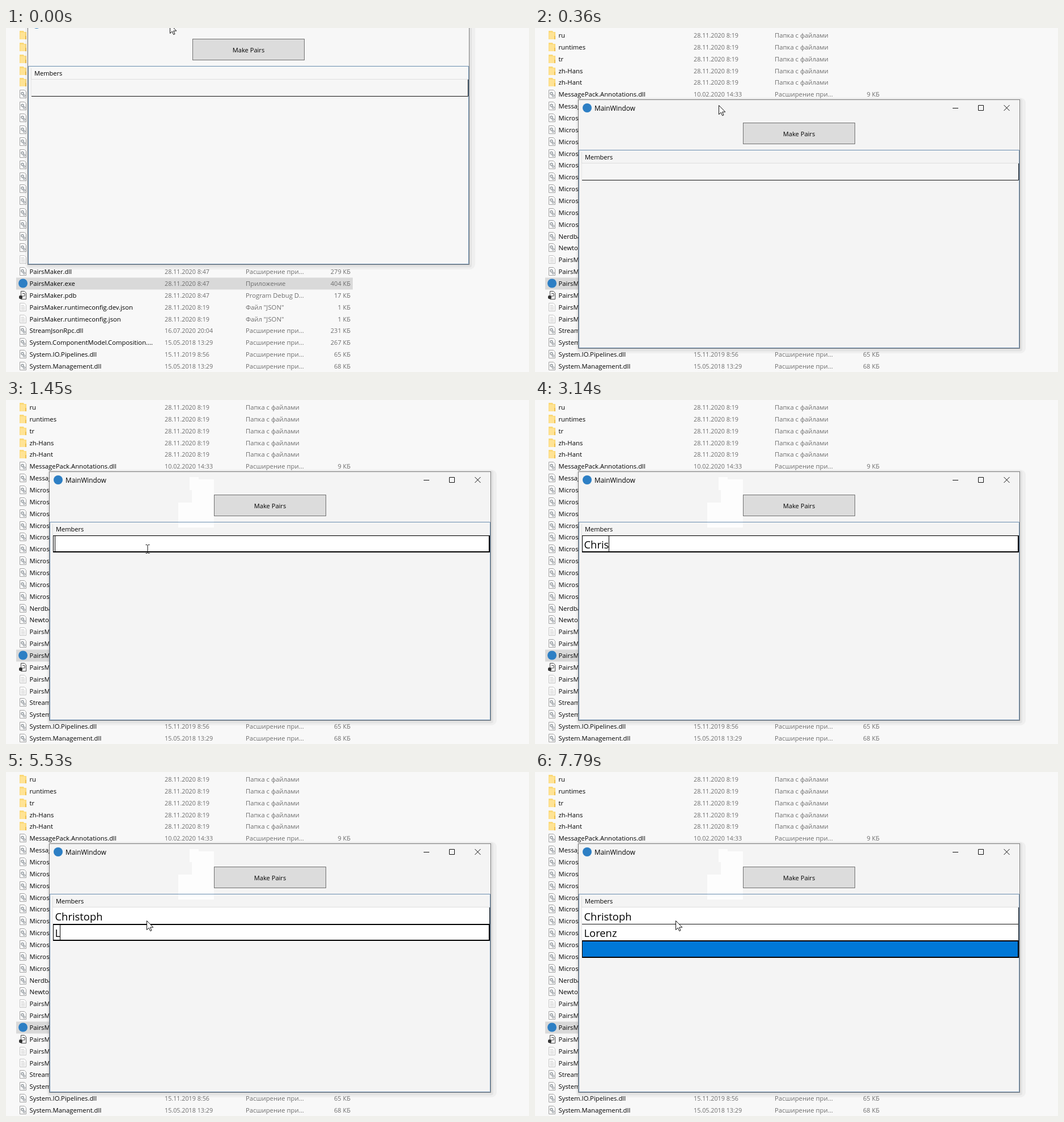
Animation, 923 px wide and 607 px high, one loop 8 s. Source, as an HTML page:

```html
<!DOCTYPE html>
<html lang="ru">
<head>
<meta charset="utf-8">
<title>Pairs</title>
<style>
html, body { margin: 0; width: 100%; height: 100%; overflow: hidden; background: #f8f8f8; }
svg { display: block; width: 100%; height: 100%; }
text { font: 11.3px "Open Sans", "Noto Sans", sans-serif; fill: #000; white-space: pre; }
.info { fill: #6d6d6d; }
.date { font-size: 10.75px; }
.size { font-size: 11px; text-anchor: end; }
.ui { font-size: 11.1px; }
.title { font-size: 11.8px; }
.cell { font-size: 18.4px; }
</style>
</head>
<body>
<svg id="stage" viewBox="0 0 923 607"></svg>
<script>
const NS = 'http://www.w3.org/2000/svg';
const LOOP = 8000;
const stage = document.getElementById('stage');

function add(parent, tag, attrs = {}, text) {
  const el = document.createElementNS(NS, tag);
  for (const k in attrs) el.setAttribute(k, attrs[k]);
  if (text !== undefined) el.textContent = text;
  parent.appendChild(el);
  return el;
}
const rect = (p, x, y, width, height, fill, more) => add(p, 'rect', { x, y, width, height, fill, ...more });
const path = (p, d, stroke, fill = 'none', more) => add(p, 'path', { d, stroke, fill, ...more });
const label = (p, x, y, cls, text) => add(p, 'text', { x, y, class: cls }, text);
const show = (el, on) => el.setAttribute('visibility', on ? 'inherit' : 'hidden');
const place = (el, x, y) => el.setAttribute('transform', `translate(${x} ${y})`);

// Latest entry of [time, ...values] that has started
const at = (steps, t) => steps.reduce((cur, s) => (s[0] <= t ? s : cur), steps[0]);

// ---- File list ----
const DLL = 'Расширение при...';
const DIR = ['dir', '28.11.2020 8:19', 'Папка с файлами', ''];
const JSON_TYPE = 'Файл "JSON"';
const hidden = name => [name, 'dll', '', '', ''];
const files = [
  ...['ru', 'runtimes', 'tr', 'zh-Hans', 'zh-Hant'].map(n => [n, ...DIR]),
  ['MessagePack.Annotations.dll', 'dll', '10.02.2020 14:33', DLL, '9 КБ'],
  hidden('MessagePack.dll'),
  ...Array.from({ length: 10 }, () => hidden('Microsoft.dll')),
  hidden('Nerdbank.Streams.dll'),
  hidden('Newtonsoft.Json.dll'),
  ['PairsMaker.deps.json', 'doc', '', '', ''],
  ['PairsMaker.dll', 'dll', '28.11.2020 8:47', DLL, '279 КБ'],
  ['PairsMaker.exe', 'app', '28.11.2020 8:47', 'Приложение', '404 КБ'],
  ['PairsMaker.pdb', 'pdb', '28.11.2020 8:47', 'Program Debug D...', '17 КБ'],
  ['PairsMaker.runtimeconfig.dev.json', 'doc', '28.11.2020 8:19', JSON_TYPE, '1 КБ'],
  ['PairsMaker.runtimeconfig.json', 'doc', '28.11.2020 8:19', JSON_TYPE, '1 КБ'],
  ['StreamJsonRpc.dll', 'dll', '16.07.2020 20:04', DLL, '231 КБ'],
  ['System.ComponentModel.Composition....', 'dll', '15.05.2018 13:29', DLL, '267 КБ'],
  ['System.IO.Pipelines.dll', 'dll', '15.11.2019 8:56', DLL, '65 КБ'],
  ['System.Management.dll', 'dll', '15.05.2018 13:29', DLL, '68 КБ']
];

const page = (g, stroke) => path(g, 'M24.5 -7.5H32.5L35.5 -4.5V6.5H24.5Z', stroke, '#fcfcfc');
const icons = {
  dir(g) {
    path(g, 'M24 -8H31L32 -6H36V7H24Z', 'none', '#fbd978');
    rect(g, 25, -5, 9, 12, '#ffe394');
    rect(g, 34, 1, 2, 6, '#eebf50');
  },
  doc(g) {
    page(g, '#c4c4c4');
    path(g, 'M26.5 -3.5H32M26.5 -1H33.5M26.5 1.5H33.5M26.5 4H33.5', '#c8c8c8');
  },
  dll(g) {
    page(g, '#a0a0a0');
    add(g, 'circle', { cx: 29, cy: -1.5, r: 2.2, fill: '#eee', stroke: '#8b9298', 'stroke-width': 1.2 });
    add(g, 'circle', { cx: 32, cy: 2.5, r: 1.8, fill: '#eee', stroke: '#8b9298', 'stroke-width': 1.1 });
  },
  pdb(g) {
    path(g, 'M26.5 -7.5H32.5L35.5 -4.5V6.5H26.5Z', '#444', '#fcfcfc');
    path(g, 'M29 -3.5H33V1H29', '#444');
    rect(g, 23, 0, 6, 6, '#333', { rx: 2 });
  },
  app(g) { add(g, 'circle', { cx: 30, cy: -0.5, r: 8, fill: '#2d7fc4' }); }
};

rect(stage, 0, 0, 923, 607, '#f8f8f8');
rect(stage, 18, 440.5, 594, 21, '#d9d9d9');
files.forEach(([name, icon, date, type, size], i) => {
  const g = add(stage, 'g');
  place(g, 0, Math.round(13 + i * 20.857));
  icons[icon](g);
  label(g, 41.5, 4, '', name);
  label(g, 280, 4, 'info date', date);
  label(g, 423, 4, 'info', type);
  label(g, 608, 4, 'info size', size);
});

// ---- Window, drawn at its resting place ----
const win = add(stage, 'g');
rect(win, 72, 123, 794, 451, '#000', { rx: 9, opacity: 0.035 });
rect(win, 75, 124.5, 785, 446, '#000', { rx: 4, opacity: 0.05 });
const body = rect(win, 76.5, 126.5, 779, 439, '#f4f4f4', { stroke: '#7c7c7c' });
const patches = [
  [630, rect(win, 324, 136, 16, 23, '#fdfdfd')],
  [780, rect(win, 328, 140, 39, 41, '#fdfdfd')],
  [910, rect(win, 304, 181, 63, 44, '#fdfdfd')]
];
add(win, 'circle', { cx: 92, cy: 141, r: 8, fill: '#2d7fc4' });
label(win, 105, 146, 'title', 'MainWindow');
path(win, 'M737 141.5H747M782.5 136.5H791.5V145.5H782.5ZM827.5 136L837.5 146M837.5 136L827.5 146', '#111');
rect(win, 367.5, 167.5, 197, 37, '#dcdcdc', { stroke: '#707070' });
label(win, 466, 191, 'ui', 'Make Pairs').setAttribute('text-anchor', 'middle');
path(win, 'M77.5 215.5H854.5V564.5H77.5Z', '#688caf');
label(win, 88, 232, 'ui', 'Members');

// ---- Grid rows: neighbours share one pixel line ----
const rowTop = i => Math.round(238.4 + 29.4 * i);
const rows = [0, 1, 2].map(i => {
  const g = add(win, 'g');
  const h = rowTop(i + 1) - rowTop(i) + 1;
  place(g, 0, rowTop(i));
  const row = {
    g,
    fill: rect(g, 83, 1, 770, h - 2, '#fff'),
    line: path(g, `M83 ${h - 0.5}H853.5V1`, '#111'),
    frame: rect(g, 83, 1, 770, h - 2, 'none', { stroke: '#000', 'stroke-width': 2 }),
    text: label(g, 86.5, h - 7, 'cell', ''),
    caret: rect(g, 0, 2, 1, h - 4, '#000')
  };
  path(g, `M82.5 0V${h}`, '#e8e8e8');
  return row;
});
path(win, 'M82.5 219V239M82 238.5H854', '#dedede');

// ---- Pointers ----
const arrow = path(stage, 'M.5 .5V16.5L4.2 13L6.7 18.6L9 17.6L6.6 12.1H11.8Z', '#111', '#fff');
const beam = path(stage, 'M246.5 255.5H249L250 256.5L251 255.5H253.5M250 256.5V269.5M246.5 270.5H249L250 269.5L251 270.5H253.5', '#111');

// ---- Timeline ----
const drag = [[0, -38, -148], [120, -22, -84], [240, -6, -28], [360, 0, 0]];
const pointer = [
  [0, 289, -7], [120, 304, 60], [240, 319, 112], [360, 324, 136], [630, 328, 140],
  [780, 355, 162], [910, 304, 206], [1040, 248, 262]
];
// Typing steps: time, letters, caret shown
const entries = [
  { name: 'Christoph', select: 1170, edit: 1450, done: 4570, keys: [
    [1450, 0, 1], [1980, 0, 0], [2100, 1, 1], [2560, 2, 1], [2710, 3, 1], [2990, 4, 1],
    [3140, 5, 1], [3730, 5, 0], [3860, 8, 1], [4270, 9, 1]] },
  { name: 'Lorenz', select: 4570, edit: 5530, done: 7790, keys: [
    [5530, 1, 1], [5680, 2, 1], [5800, 3, 1], [6350, 4, 1], [6940, 4, 0], [7470, 6, 1]] },
  { name: '', select: 7790, edit: Infinity, done: Infinity, keys: [[0, 0, 0]] }
];

function drawRow(row, entry, first, t) {
  const selected = t >= entry.select && t < entry.done;
  const editing = selected && t >= entry.edit;
  const [, count, blink] = at(entry.keys, t);
  show(row.g, first || t >= entry.select);
  row.fill.setAttribute('fill', t < entry.select ? '#f6f6f6' : selected && !editing ? '#0078d7' : '#fff');
  show(row.frame, selected);
  row.text.textContent = t >= entry.edit ? entry.name.slice(0, count) : '';
  show(row.caret, editing && blink);
  if (editing) row.caret.setAttribute('x', Math.floor(86.4 + row.text.getComputedTextLength()));
}

function render(t) {
  const [, dx, dy] = at(drag, t);
  place(win, dx, dy);
  body.setAttribute('fill', t < 360 ? '#f7f7f7' : '#f4f4f4');
  patches.forEach(([start, el]) => show(el, t >= start));
  rows.forEach((row, i) => drawRow(row, entries[i], i === 0, t));
  const [, px, py] = at(pointer, t);
  place(arrow, px, py);
  show(arrow, t < 1450 || t >= 4570);
  show(beam, t >= 1450 && t < 2100);
}

const start = performance.now();
function tick() {
  render((performance.now() - start) % LOOP);
  requestAnimationFrame(tick);
}
tick();
</script>
</body>
</html>
```
